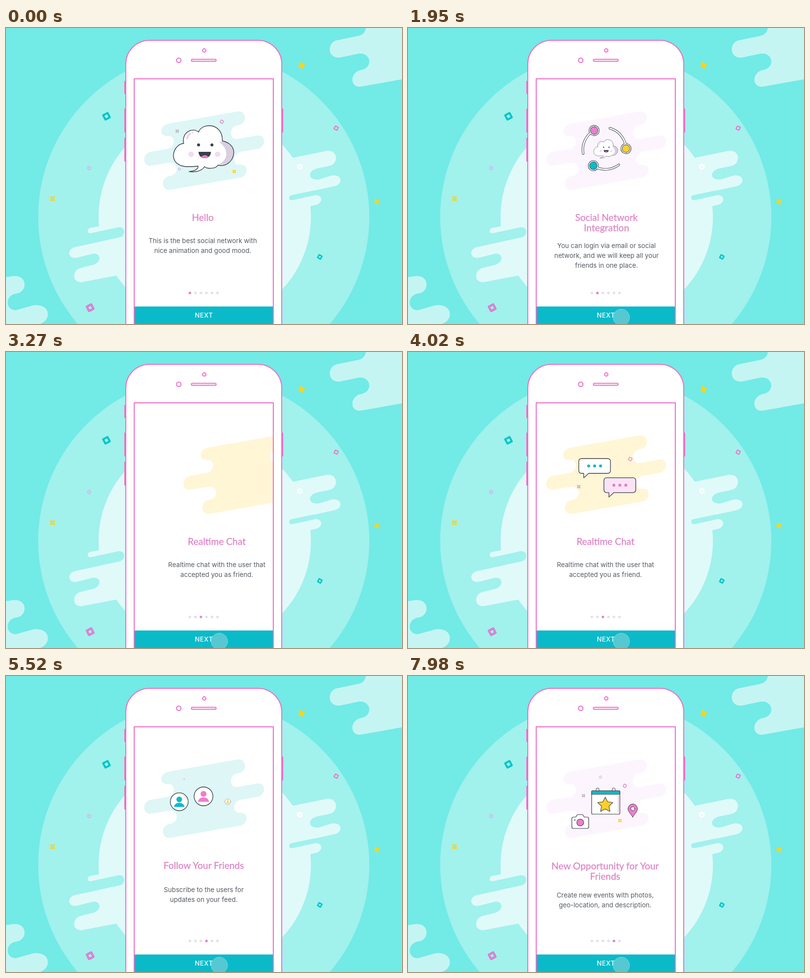
An HTML page that plays this animation: 800 by 600 pixels, repeating every 8000 ms.

```html
<!DOCTYPE html>
<html lang="en">
<head>
<meta charset="utf-8">
<title>Onboarding</title>
<style>
  html, body { margin: 0; width: 100%; height: 100%; overflow: hidden; background: #72eae6; }
  svg { display: block; width: 100vw; height: 100vh; }
  .title { font: 400 19px Lato, sans-serif; fill: #dd84c5; stroke: #dd84c5; stroke-width: .3; }
  .body { font: 400 13.2px Inter, sans-serif; fill: #555a63; }
  .next { font: 500 13px Inter, sans-serif; letter-spacing: .5px; fill: #fff; }
  text { text-anchor: middle; }
</style>
</head>
<body>
<svg id="stage" viewBox="0 0 800 600"></svg>
<script>
const LOOP = 8000, MOVE = 500;
const PINK = '#ee6fca', TEAL = '#0bbac9', YELLOW = '#fdd02f', INK = '#3b3e47', PALE = '#e0faf9', MID = '#a1f1ed';

// Each turn of the page: start time, text easing power, distance between blobs.
const turns = [
  { at: 1248, power: 2.4, gap: 148 },
  { at: 2923, power: 1.97, gap: 376 },
  { at: 4645, power: 2.27, gap: 376 },
  { at: 6229, power: 2.65, gap: 376 }
];
const slides = [
  { cx: 397.5, y: 391, by: 436, tint: '#def6f6', title: ['Hello'],
    body: ['This is the best social network with', 'nice animation and good mood.'] },
  { cx: 401, y: 391, by: 446, tint: '#fcf5fe', title: ['Social Network', 'Integration'],
    body: ['You can login via email or social', 'network, and we will keep all your', 'friends in one place.'] },
  { cx: 399, y: 391, by: 436, tint: '#fff6d6', title: ['Realtime Chat'],
    body: ['Realtime chat with the user that', 'accepted you as friend.'] },
  { cx: 399.5, y: 391, by: 437.5, tint: '#def6f6', title: ['Follow Your Friends'],
    body: ['Subscribe to the users for', 'updates on your feed.'] },
  { cx: 398.3, y: 392, by: 448.5, tint: '#fcf5fe', title: ['New Opportunity for Your', 'Friends'],
    body: ['Create new events with photos,', 'geo-location, and description.'] }
];

const path = (d, fill, extra = '') => `<path d="${d}" fill="${fill}" ${extra}/>`;
const circle = (x, y, r, fill, extra = '') => `<circle cx="${x}" cy="${y}" r="${r}" fill="${fill}" ${extra}/>`;
const rect = (x, y, w, h, r, fill, extra = '') =>
  `<rect x="${x}" y="${y}" width="${w}" height="${h}" rx="${r}" fill="${fill}" ${extra}/>`;
const line = (color, width = 1.2) => `stroke="${color}" stroke-width="${width}" stroke-linejoin="round" stroke-linecap="round"`;
const at = (x, y, inner, more = '') => `<g transform="translate(${x} ${y}) ${more}">${inner}</g>`;
const lines = (cls, rows, x, y, step) =>
  rows.map((s, i) => `<text class="${cls}" x="${x}" y="${y + i * step}">${s}</text>`).join('');

const diamond = (s, color, w, turn) =>
  `<g transform="rotate(${turn})">${rect(-s / 2, -s / 2, s, s, .5, 'none', line(color, w))}</g>`;
const ring = (color, r = 2.2, w = 1.2) => circle(0, 0, r, 'none', line(color, w));
const sparkle = (color, k = 1) =>
  path('M-4 -4 Q0 -2 4 -4 Q2 0 4 4 Q0 2 -4 4 Q-2 0 -4 -4Z M0 -1.4 L-1.4 0 L0 1.4 L1.4 0Z', color,
    `fill-rule="evenodd" transform="scale(${k})"`);

const blobPath = 'M328 194 L468 169 C487 167 487 193 472 196 L468 197 C450 200 450 227 468 225 L506 218 ' +
  'C526 215 526 241 508 245 L474 251 C456 255 457 279 474 277 C490 276 490 300 474 303 L332 328 ' +
  'C313 331 312 303 330 300 C350 298 350 272 330 273 L294 279 C274 282 275 254 292 251 L326 245 ' +
  'C344 241 343 216 325 219 C310 220 309 198 328 194Z';

const cloudPath = 'M359 234 C340 236 332 261 344 273 C355 284 372 281 388 280 C389 286 381 290 370 291 ' +
  'C382 293 396 290 401 281 C406 286 424 286 428 278 C445 282 460 269 460 252 C460 240 450 231 437 229 ' +
  'C438 209 425 198 411 198 C400 198 392 203 389 211 C377 200 354 212 359 234Z';
const cloud =
  path(cloudPath, '#fff') +
  path('M437 230 C449 231 459 240 459 252 C459 268 445 279 430 277 C449 266 451 247 431 231Z', '#d8cfe0') +
  path('M366 224 Q367 217 372 214', 'none', line('#f1d0ec', 4)) + circle(377, 212.5, 1.6, '#f1d0ec') +
  path(cloudPath, 'none', line(INK, 1.4)) +
  circle(374, 256, 5.6, '#f3daf3') + circle(427.5, 256, 5.6, '#f3daf3') +
  circle(389, 237, 3, INK) + circle(416, 237, 3, INK) +
  path('M389 251 H414 C414 268 389 268 389 251Z', INK) +
  path('M394 261 Q402 254 409 261 Q402 266 394 261Z', '#e07fcb');

const orbitArcs = ['M364 214 A47 47 0 0 0 355 268', 'M394 198 A47 47 0 0 1 438 231', 'M386 290 A47 47 0 0 0 436 265'];
const orbitNodes = [[364, 214, TEAL], [438, 231, '#ec7fd0'], [386, 290, YELLOW]];
const orbit = `<g transform="translate(-396 -244)">` +
  orbitArcs.map(d => path(d, 'none', line(INK, 5))).join('') +
  orbitNodes.map(([x, y]) => circle(x, y, 11, '#fff', line(INK, 1.1))).join('') +
  orbitArcs.map(d => path(d, 'none', line('#fff', 3))).join('') +
  orbitNodes.map(([x, y, c]) => circle(x, y, 8.2, c, line(INK, 1))).join('') + '</g>';

const badge = circle(0, 0, 9, '#fff', line('#77787f', 1.2));
const bubble = fill => path('M-26 -16 H26 Q32 -16 32 -10 V8 Q32 14 26 14 H-12 L-22 23 V14 H-26 Q-32 14 -32 8 V-10 Q-32 -16 -26 -16Z', fill, line(INK, 1.3));
const typing = color => [-12, 0, 12].map(x => circle(x, -1, 3, color)).join('');
const friend = color => circle(0, 0, 19, '#fff', line(INK, 1.3)) + circle(0, -5, 6, color) + path('M-11 11 C-10 -1 10 -1 11 11Z', color);

const calendar =
  rect(-28.5, -23.5, 57, 47.5, 2, '#fff', line(INK, 1.2)) +
  path('M-28.5 -16.5 V-22 Q-28.5 -23.5 -27 -23.5 H27 Q28.5 -23.5 28.5 -22 V-16.5Z', TEAL, line(INK, 1)) +
  path('M25.5 -13 V20', 'none', line('#d8d2e0', 2)) +
  [-16.5, 16].map(x => path(`M${x - 3} -23.5 V-26 Q${x - 3} -29 ${x} -29 Q${x + 3} -29 ${x + 3} -26 V-23.5Z`, '#fff', line(INK, 1))).join('');
const starPoints = Array.from({ length: 10 }, (_, i) => {
  const r = i % 2 ? 8 : 16, a = i * Math.PI / 5;
  return `${(r * Math.sin(a)).toFixed(2)} ${(-r * Math.cos(a)).toFixed(2)}`;
}).join(' L');
const star = path(`M${starPoints}Z`, YELLOW, line(INK, 1.1));
const camera =
  path('M-14 -9 H-9 L-6 -14 H5 L8 -9 H14 Q17 -9 17 -6 V11 Q17 14 14 14 H-14 Q-17 14 -17 11 V-6 Q-17 -9 -14 -9Z', '#fff', line(INK, 1.2)) +
  circle(0, 2, 7, '#ec7fd0', line(INK, 1.1)) + circle(-11, -3, 1.2, INK);
const pin = path('M0 17 C-4 10 -9.5 6 -9.5 0 A9.5 9.5 0 0 1 9.5 0 C9.5 6 4 10 0 17Z', '#ec7fd0', line(INK, 1)) +
  circle(0, 0, 4, '#fff', line(INK, 1));

const grey = '#b9b9c4', lilac = '#cfb3ea';
const spark = diamond(5.6, '#e07fcb', 1.3, 28), gold = sparkle(YELLOW, .95), dim = sparkle(grey, .9);
// [slide, x, y, delay, drawing, spin]
const items = [
  [0, 346, 209, 0, dim], [0, 436, 190, 0, spark], [0, 350.5, 286, 0, ring(lilac)], [0, 461, 291, 0, gold],
  [1, 396, 244, 80, orbit, -150], [1, 322, 253, 380, badge], [1, 468, 217, 450, badge], [1, 409, 311, 520, badge],
  [1, 337, 203, 250, dim], [1, 454, 186, 300, spark], [1, 357, 304, 350, ring(grey)], [1, 435, 297, 400, gold],
  [2, 377, 232, 60, bubble('#fff') + typing(TEAL)], [2, 428, 271, 300, bubble('#fbe3f6') + typing('#e07fcb')],
  [2, 345, 273, 350, dim], [2, 449, 217, 400, spark],
  [3, 399, 244, 60, friend('#ec7fd0')], [3, 350, 255, 250, friend(TEAL)], [3, 448, 255, 350, friend(YELLOW)],
  [3, 360, 209, 350, spark], [3, 429, 296, 420, gold],
  [4, 399.5, 256, 20, calendar], [4, 454, 269, 300, pin], [4, 348, 295, 640, camera], [4, 398.5, 261.5, 620, star, -70],
  [4, 389, 205, 150, ring(lilac)], [4, 438, 222.5, 220, spark], [4, 354.5, 242.5, 280, dim], [4, 428, 293, 350, gold]
];

const backdrop =
  rect(0, 0, 800, 600, 0, '#72eae6') + circle(399.5, 383, 334.5, MID) + circle(401.5, 383, 214.5, PALE) +
  path('M727 0 Q725 13 712 16 L668 25 C649 29 648 62 674 60 L712 52 C738 49 742 80 718 85 C694 89 694 121 716 119 L800 104 V0Z', '#c4f5f3') +
  path('M0 505 L14 503 C44 500 44 534 22 538 C-2 540 -3 572 20 572 L56 562 C92 558 92 594 68 600 L0 600Z', '#c4f5f3') +
  path('M560 267 L648 249 C671 246 673 276 652 280 L632 284 C608 288 608 309 632 307 L658 299 C681 296 681 318 662 321 L612 332 L580 330Z', PALE) +
  path('M577 344 L622 334.5', 'none', line(MID, 10)) +
  path('M600 344.5 L624 339 C641 337 641 357 624 359 L600 364Z', PALE) +
  path('M171 416 L225 404 C243 401 243 422 228 425 L138 444Z', MID) +
  path('M171 405 L240 392 V401 L171 416 C163 417 163 406 171 405Z', PALE) +
  path('M140 444 L232 424 L240 496 L222 502 L154 515 C133 518 132 490 152 486 L172 481 C194 478 194 454 174 458 L142 466 C124 468 123 447 140 444Z', PALE) +
  at(597, 75.5, path('M-2 -8 Q1 -3 8 -2 Q3 1 2 8 Q-1 3 -8 2 Q-3 -1 -2 -8Z M0 -2 L-2 0 L0 2 L2 0Z', '#fbd51c', 'fill-rule="evenodd"')) +
  at(203, 179, diamond(10, '#08c4c6', 4, -28)) + at(667, 203, diamond(6.5, PINK, 2, 28)) +
  at(634, 464, diamond(6.5, '#08c4c6', 2.8, 28)) + at(170, 567, diamond(10, '#d65fc5', 4, -28)) +
  at(170, 567, diamond(10, '#f7a5df', 1.2, -28)) +
  at(168, 284, ring('#cdbdf0', 3, 2.4)) + at(593.5, 281.5, ring('#fff', 4, 3.4)) +
  at(94, 346, sparkle('#fbd51c', 1.3)) + at(749, 352, sparkle('#fbd51c', 1.3), 'rotate(15)');

const edge = line(PINK, 2);
const phone =
  [[240, 108, 25], [240, 164, 47], [240, 223, 47], [555, 164, 47]].map(([x, y, h]) => rect(x, y, 4, h, 1, '#fff', edge)).join('') +
  rect(242, 25, 315, 700, 48, '#fff', edge) +
  circle(400.5, 45.5, 3.4, '#fff', edge) + circle(349, 65.5, 4.5, '#fff', edge) + rect(374.5, 63.5, 50, 4, 2, '#fff', edge);

const stage = document.getElementById('stage');
stage.innerHTML = `<defs><clipPath id="screen"><rect x="260" y="104" width="279" height="496"/></clipPath></defs>` +
  backdrop + phone +
  `<g clip-path="url(#screen)">` +
  slides.map(s => path(blobPath, s.tint, 'class="blob"')).join('') +
  items.map(i => `<g class="item">${i[4]}</g>`).join('') +
  `<g id="cloud">${cloud}</g>` +
  slides.map(s => `<g class="copy">${lines('title', s.title, s.cx, s.y, 21)}${lines('body', s.body, s.cx, s.by, 20.2)}</g>`).join('') +
  [0, 1, 2, 3, 4, 5].map(i => circle(371.5 + i * 11.15, 537, 2.6, '#e1e1e6', 'class="dot"')).join('') +
  rect(260, 564.5, 279, 36, 0, TEAL) + '<text class="next" x="399.8" y="587.4">NEXT</text></g>' +
  rect(259, 103, 281, 600, 0, 'none', line(PINK, 2)) +
  `<g id="finger">${circle(0, 0, 16.5, '#84d2d9', 'fill-opacity=".62" stroke="#9be0e5" stroke-opacity=".7"')}</g>`;

const all = cls => [...stage.querySelectorAll(cls)];
const blobs = all('.blob'), copies = all('.copy'), dots = all('.dot'), parts = all('.item');
const cloudEl = document.getElementById('cloud'), finger = document.getElementById('finger');

const clamp = v => Math.min(1, Math.max(0, v));
const smooth = v => (1 - Math.cos(Math.PI * clamp(v))) / 2;
const back = v => 1 + 2.2 * (v - 1) ** 3 + 1.2 * (v - 1) ** 2;
const place = (el, x, y, k = 1, r = 0) => {
  el.setAttribute('display', k > .005 ? 'inline' : 'none');
  el.setAttribute('transform', `translate(${x} ${y}) rotate(${r}) scale(${k})`);
};
const mix = (a, b, v) => `rgb(${a.map((c, i) => Math.round(c + (b[i] - c) * v))})`;

function draw(t) {
  const text = turns.map(q => 1 - (1 - clamp((t - q.at) / MOVE)) ** q.power);
  const drift = turns.map((q, i) => i ? smooth((t - q.at) / MOVE) : text[0]);
  const leave = i => turns[i] ? clamp((t - turns[i].at) / 150) : 0;

  slides.forEach((s, i) => {
    const came = i ? text[i - 1] : 1, left = i < 4 ? text[i] : 0;
    const x = 280 * (1 - came - left);
    place(copies[i], x, 0, Math.abs(x) < 279 ? 1 : 0);
    const enter = i ? turns[i - 1].gap * (1 - drift[i - 1]) : 0;
    const exit = i === 0 ? 280 * text[0] : i < 4 ? turns[i].gap * drift[i] : 0;
    const bx = enter - exit;
    place(blobs[i], bx, 0, bx > -279 && bx < 279 && (!i || t > turns[i - 1].at) ? 1 : 0);
    dots[i].setAttribute('fill', mix([225, 225, 230], [226, 130, 200], came - left));
  });

  items.forEach(([slide, x, y, delay, , spin = 0], i) => {
    if (!slide) return place(parts[i], x - 280 * text[0], y, text[0] < 1 ? 1 : 0);
    const v = clamp((t - turns[slide - 1].at - MOVE - delay) / 320);
    place(parts[i], x, y, (v ? back(v) : 0) * (1 - leave(slide)), spin * (1 - smooth(v)));
  });

  const k = (1 - .6 * smooth((t - 1420) / 340)) * (1 - leave(1));
  place(cloudEl, 399.5 * (1 - k), 245 * (1 - k), k);

  const press = [...turns.map(q => q.at), 8020]
    .reduce((sum, s) => sum + Math.sin(Math.PI * clamp((t - s + 260) / 220)), 0);
  const show = smooth((t - 890) / 180);
  place(finger, 431, 586.5, show ? 1 - .1 * press : 0);
  finger.setAttribute('opacity', show);
}

const begin = performance.now();
function tick() {
  draw((performance.now() - begin) % LOOP);
  requestAnimationFrame(tick);
}
draw(0);
requestAnimationFrame(tick);
</script>
</body>
</html>
```
